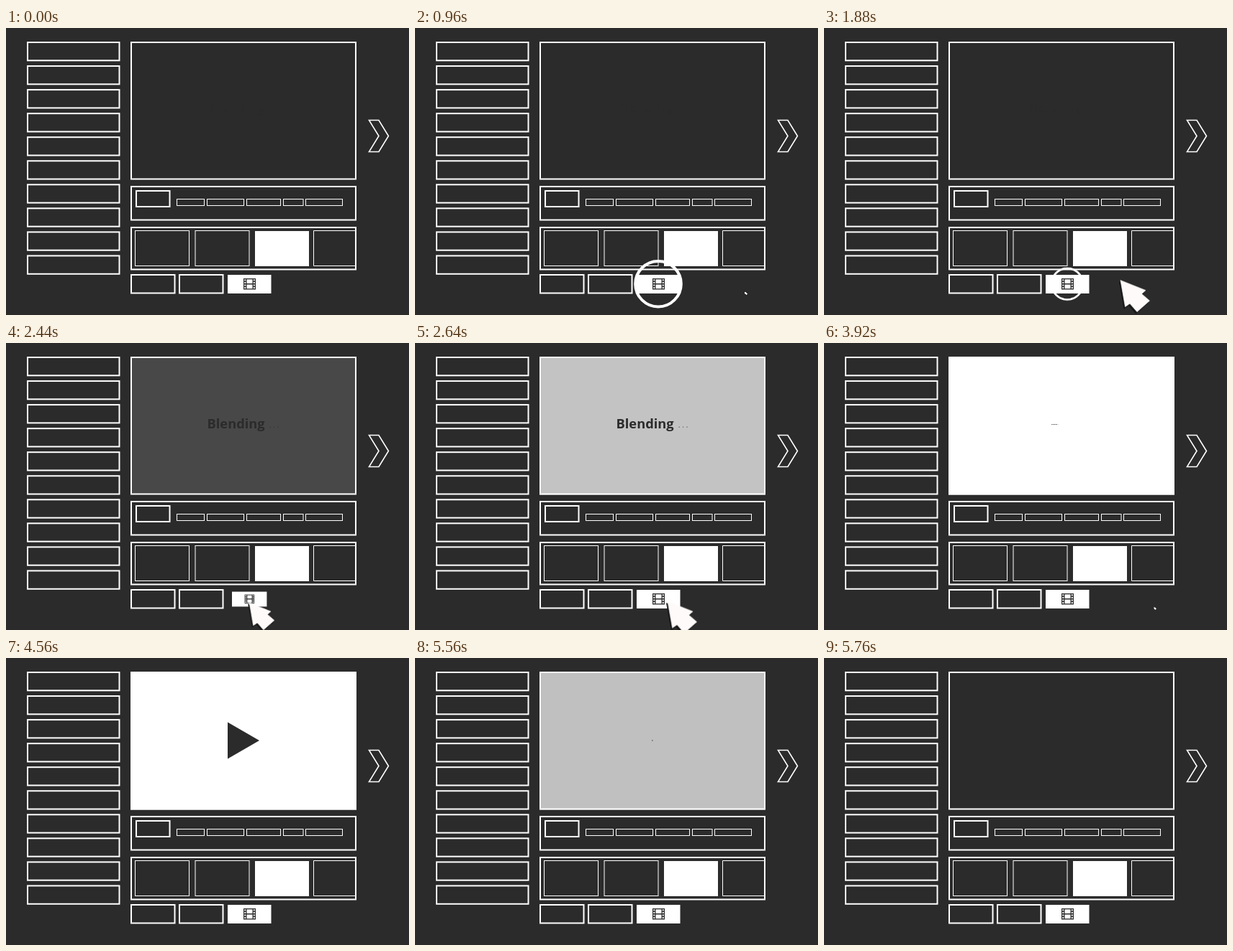
Recreate the animation shown at these times as an HTML page. Size 560 by 400 pixels, loop 6000 ms.

```html
<!DOCTYPE html>
<html lang="en">
<head>
<meta charset="utf-8">
<title>Blending player</title>
<style>
  :root {
    --bg: #2b2b2b;
    --pop-in: cubic-bezier(.34, 1.56, .64, 1);
    --pop-out: cubic-bezier(.36, 0, .66, -.56);
    --glide: cubic-bezier(.45, 0, .55, 1);
  }
  html, body { margin: 0; width: 100%; height: 100%; overflow: hidden; background: var(--bg); }
  svg { display: block; width: 560px; height: 400px; }

  .line { fill: none; stroke: #fff; stroke-width: 2; }
  .thin { fill: none; stroke: #fff; stroke-width: 1; }
  .white { fill: #fff; }
  .dark { fill: var(--bg); }
  .label { font: 700 18.3px "Open Sans", "Noto Sans", sans-serif; }

  .anim { animation: 6s linear infinite; }
  #ring { animation-name: ring; transform-origin: 338px 356.7px; }
  #button { animation-name: button; transform-origin: 338px 357px; }
  #screen { animation-name: screen; }
  #message { animation-name: message; transform-origin: 320px 113px; }
  #dot1 { animation-name: dot1; transform-origin: 367.3px 117.2px; }
  #dot2 { animation-name: dot2; transform-origin: 372.7px 117.2px; }
  #dot3 { animation-name: dot3; transform-origin: 378.1px 117.2px; }
  #play { animation-name: play; transform-origin: 330px 115px; }
  #move { animation-name: move; }
  #pop { animation-name: pop; transform-origin: 460px 370px; }
  #press { animation-name: press; transform-origin: 441px 347.5px; }

  @keyframes ring {
    0% { transform: scale(0); }
    2.67% { transform: scale(0); animation-timing-function: var(--pop-in); }
    15% { transform: scale(1); }
    29.6% { transform: scale(1); animation-timing-function: var(--pop-out); }
    38%, 100% { transform: scale(0); }
  }
  @keyframes pop {
    0% { transform: scale(0); }
    15.15% { transform: scale(0); animation-timing-function: var(--pop-in); }
    23.4% { transform: scale(1); }
    60% { transform: scale(1); animation-timing-function: var(--pop-out); }
    68.33%, 100% { transform: scale(0); }
  }
  @keyframes move {
    0% { transform: none; }
    29.67% { transform: translate(0, 0); animation-timing-function: var(--glide); }
    38.33% { transform: translate(-103px, 14.5px); }
    43% { transform: translate(-103px, 14.5px); animation-timing-function: var(--glide); }
    51.5%, 100% { transform: translate(0, 0); }
  }
  @keyframes press {
    0%, 38.33% { transform: scale(1); }
    40.33%, 41% { transform: scale(.86); }
    43.67%, 100% { transform: scale(1); }
  }
  @keyframes button {
    0%, 38.33% { transform: scale(1); }
    40.33%, 41% { transform: scale(.8); }
    43.67%, 100% { transform: scale(1); }
  }
  @keyframes screen {
    0% { opacity: 0; }
    40.08% { opacity: 0; animation-timing-function: cubic-bezier(.5, 1, .89, 1); }
    48.4% { opacity: 1; }
    87.67% { opacity: 1; animation-timing-function: cubic-bezier(.22, 0, .58, 0); }
    96%, 100% { opacity: 0; }
  }
  @keyframes message {
    0% { transform: scale(1); }
    61.25% { transform: scale(1); animation-timing-function: var(--pop-out); }
    67.9%, 100% { transform: scale(0); }
  }
  @keyframes dot1 { 0%, 51.3% { transform: scale(.3); } 53.3%, 100% { transform: scale(1); } }
  @keyframes dot2 { 0%, 54.1% { transform: scale(.3); } 56.1%, 100% { transform: scale(1); } }
  @keyframes dot3 { 0%, 56.8% { transform: scale(.3); } 58.8%, 100% { transform: scale(1); } }
  @keyframes play {
    0% { transform: scale(0); }
    67.5% { transform: scale(0); animation-timing-function: var(--pop-in); }
    75.83% { transform: scale(1); }
    86.4% { transform: scale(1); animation-timing-function: var(--pop-out); }
    94.67%, 100% { transform: scale(0); }
  }
</style>
</head>
<body>
<svg viewBox="0 0 560 400">
  <defs>
    <path id="arrow" stroke-linejoin="round" d="M441 347.5 L476 361.5 L470.5 366.5 L481.5 376 L464 391.5 L454 380 L447.5 384.5 Z"/>
  </defs>

  <g id="menu" class="line"></g>

  <g class="line">
    <rect x="174" y="20" width="312" height="190.5"/>
    <rect x="174" y="221" width="312" height="46.5"/>
    <rect x="181" y="227" width="46.5" height="22"/>
    <rect x="174" y="278" width="312" height="58.5"/>
    <rect x="174" y="344" width="60.5" height="25.5"/>
    <rect x="241" y="344" width="60.5" height="25.5"/>
  </g>
  <g class="thin">
    <rect x="237.5" y="238.5" width="38" height="9"/>
    <rect x="279.5" y="238.5" width="51" height="9"/>
    <rect x="334.5" y="238.5" width="47" height="9"/>
    <rect x="385.5" y="238.5" width="27.5" height="9"/>
    <rect x="416.5" y="238.5" width="51" height="9"/>
    <rect x="179.5" y="282.5" width="75" height="49"/>
    <rect x="263" y="282.5" width="75" height="49"/>
    <path d="M486 282.5 H427.5 V331.5 H486"/>
  </g>
  <rect class="white" x="346" y="283" width="75" height="49"/>
  <path class="thin" style="stroke-width:1.6" d="M504.5 128.5 H518 L531.5 150.5 L518 172.5 H504.5 L518 150.5 Z"/>

  <rect id="screen" class="anim white" x="173" y="19" width="314" height="192.5"/>
  <g id="message" class="anim dark">
    <text class="label" x="279.5" y="119">Blending</text>
    <circle id="dot1" class="anim" cx="367.3" cy="117.2" r="2.1"/>
    <circle id="dot2" class="anim" cx="372.7" cy="117.2" r="2.1"/>
    <circle id="dot3" class="anim" cx="378.1" cy="117.2" r="2.1"/>
  </g>
  <path id="play" class="anim dark" d="M308 89.5 L352 115 L308 140.5 Z"/>

  <g id="button" class="anim">
    <rect class="white" x="308" y="344" width="60.5" height="26"/>
    <rect class="dark" x="330" y="349" width="17" height="15.5"/>
    <g id="film" class="white">
      <rect x="334.5" y="350.3" width="8" height="5.7"/>
      <rect x="334.5" y="357.5" width="8" height="5.7"/>
    </g>
  </g>

  <circle id="ring" class="anim" cx="338" cy="356.7" r="31.8" fill="none" stroke="#fff" stroke-width="4"/>

  <g id="move" class="anim"><g id="pop" class="anim"><g id="press" class="anim">
    <use href="#arrow" x="-1.5" y="2.5" fill="#171717" stroke="#171717"/>
    <use href="#arrow" fill="#fffafa" stroke="#fffafa" stroke-width=".6"/>
  </g></g></g>
</svg>
<script>
  function addRect(parent, x, y, width, height) {
    const rect = document.createElementNS("http://www.w3.org/2000/svg", "rect");
    for (const [key, value] of Object.entries({ x, y, width, height })) rect.setAttribute(key, value);
    document.getElementById(parent).append(rect);
  }
  for (let i = 0; i < 10; i++) addRect("menu", 30, 20 + 33.05 * i, 127.5, 25.3);
  // sprocket holes on both edges of the film icon
  for (let i = 0; i < 4; i++) {
    for (const x of [331.2, 343.8]) addRect("film", x, 350.3 + 3.6 * i, 2, 2);
  }
</script>
</body>
</html>
```
